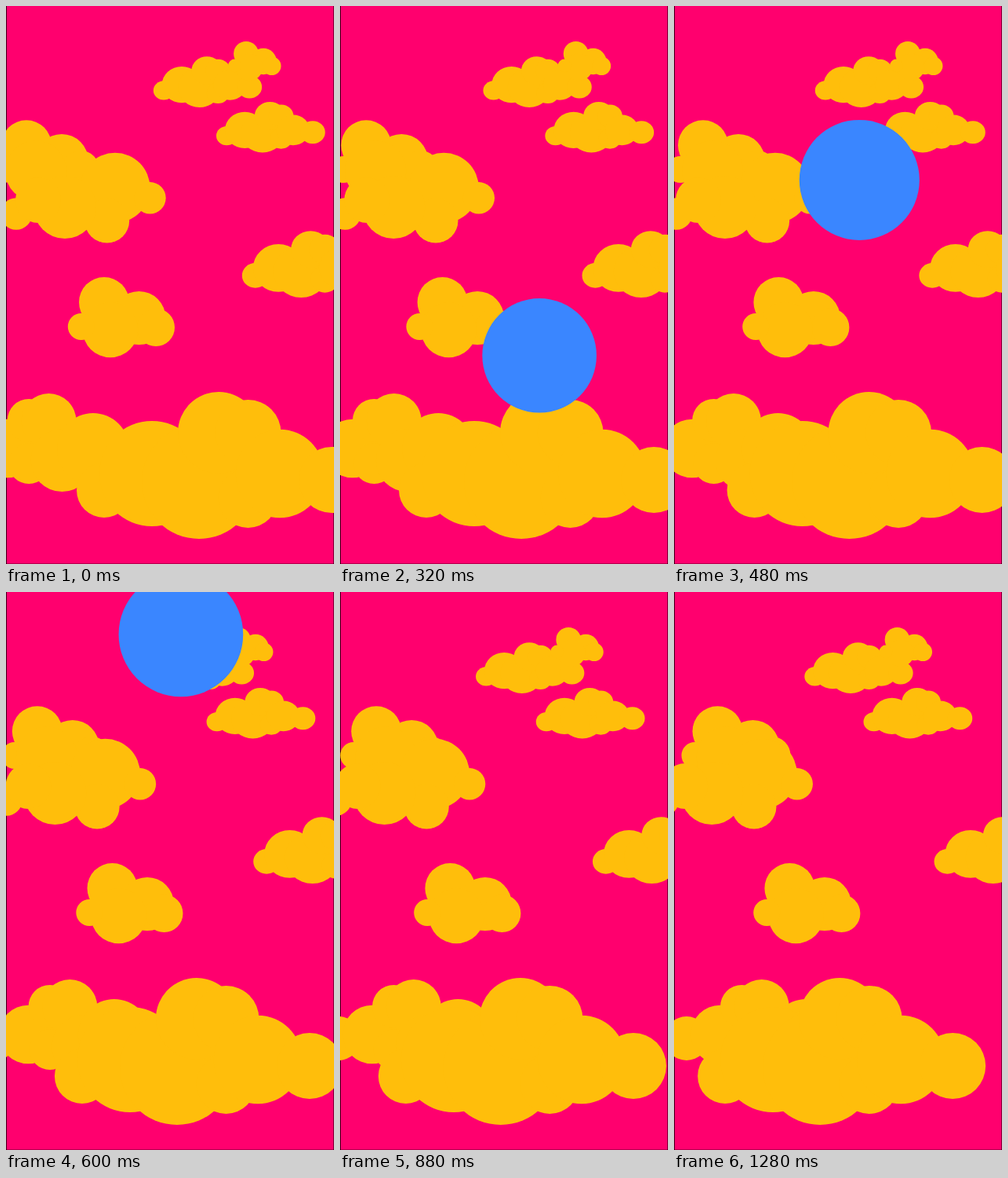
Write an HTML page that moves like this. It is 418x710 px and loops after 1800 ms.

```html
<!DOCTYPE html>
<html lang="en">
<head>
<meta charset="utf-8">
<title>Drifting clouds</title>
<style>
  html, body { margin: 0; width: 100%; height: 100%; overflow: hidden; background: #ff006e; }
  svg { display: block; width: 418px; height: 710px; }
</style>
</head>
<body>
<svg id="stage" viewBox="0 0 418 710" width="418" height="710">
  <rect width="418" height="710" fill="#ff006e"/>
  <path d="M.5 0V710" stroke="#000" stroke-opacity=".75"/>
  <path d="M417.5 0V710" stroke="#000" stroke-opacity=".5"/>
  <path d="M0 709.5H418" stroke="#000" stroke-opacity=".3"/>
</svg>
<script>
const NS = 'http://www.w3.org/2000/svg';
const stage = document.getElementById('stage');
const LOOP = 1800, STEP = 40, LAST = 32;

// Puffs are [cx, cy, r]
const wide = [
  [125, 616, 35], [186, 595, 67], [246, 605, 73], [271, 543, 52],
  [308.5, 543, 42], [308.5, 626, 38], [349, 595, 56.2], [415, 603, 42]
];
const tail = [
  [-41.3, 568, 28], [1.5, 563, 37.3], [29.2, 527.5, 27.5], [29.2, 582, 26],
  [54.5, 528, 35], [71.5, 578, 40], [111, 564, 46]
];
const round = [
  [125, 377, 32], [169.5, 397, 34], [191, 409, 24], [133, 412, 35.3], [95.8, 408, 17]
];
const bankFront = [
  [139, 231.3, 44.5], [183.5, 244.3, 20.2], [128.7, 273, 28.5],
  [75, 256, 40], [13, 264.5, 20.3], [41, 247, 29]
];
const bankBack = [
  [26, 177.2, 32], [71, 197, 34], [95, 208, 24], [-3, 208, 17], [38, 210, 39]
];

function add(parent, name, attrs) {
  const el = document.createElementNS(NS, name);
  for (const key in attrs) el.setAttribute(key, attrs[key]);
  return parent.appendChild(el);
}

// Maps the point (ox, oy) of a shape to (x, y) with the given scale
function place(ox, oy, x, y, sx, sy) {
  return `translate(${x} ${y}) scale(${sx} ${sy}) translate(${-ox} ${-oy})`;
}

const movers = [];
function cloud(puffs, speed, transform = '') {
  const outer = add(stage, 'g', { fill: '#ffbe0b' });
  const inner = add(outer, 'g', { transform });
  for (const [cx, cy, r] of puffs) add(inner, 'circle', { cx, cy, r });
  movers.push({ el: outer, speed });
}

cloud(wide, -0.672, place(90, 491, 187.8, 64.2, 0.377, 0.346));
cloud(round, -0.672, place(79, 345, 283.2, 45, 0.495, 0.49));
cloud(wide, -0.828, place(90, 491, 268, 122, 0.378, 0.345));
cloud(bankBack, 0.922);
cloud(bankFront, -0.836);
cloud(wide, 0.96, place(90, 491, 300.8, 286.2, 0.483, 0.4535));
cloud(round, 0.7);
cloud(tail, 1.79);
cloud(wide, -1.87);

const ball = add(stage, 'circle', { fill: '#3a86ff' });

function draw(time) {
  const n = Math.min(LAST, Math.floor((time % LOOP) / STEP));
  for (const { el, speed } of movers) {
    el.setAttribute('transform', `translate(${speed * n} 0)`);
  }
  ball.setAttribute('cx', 289.8 - 4.46 * n);
  ball.setAttribute('cy', 891.5 - 55.84 * n);
  ball.setAttribute('r', 65.3 + 0.935 * n);
}

const start = performance.now();
function tick() {
  draw(performance.now() - start);
  requestAnimationFrame(tick);
}
tick();
</script>
</body>
</html>
```
